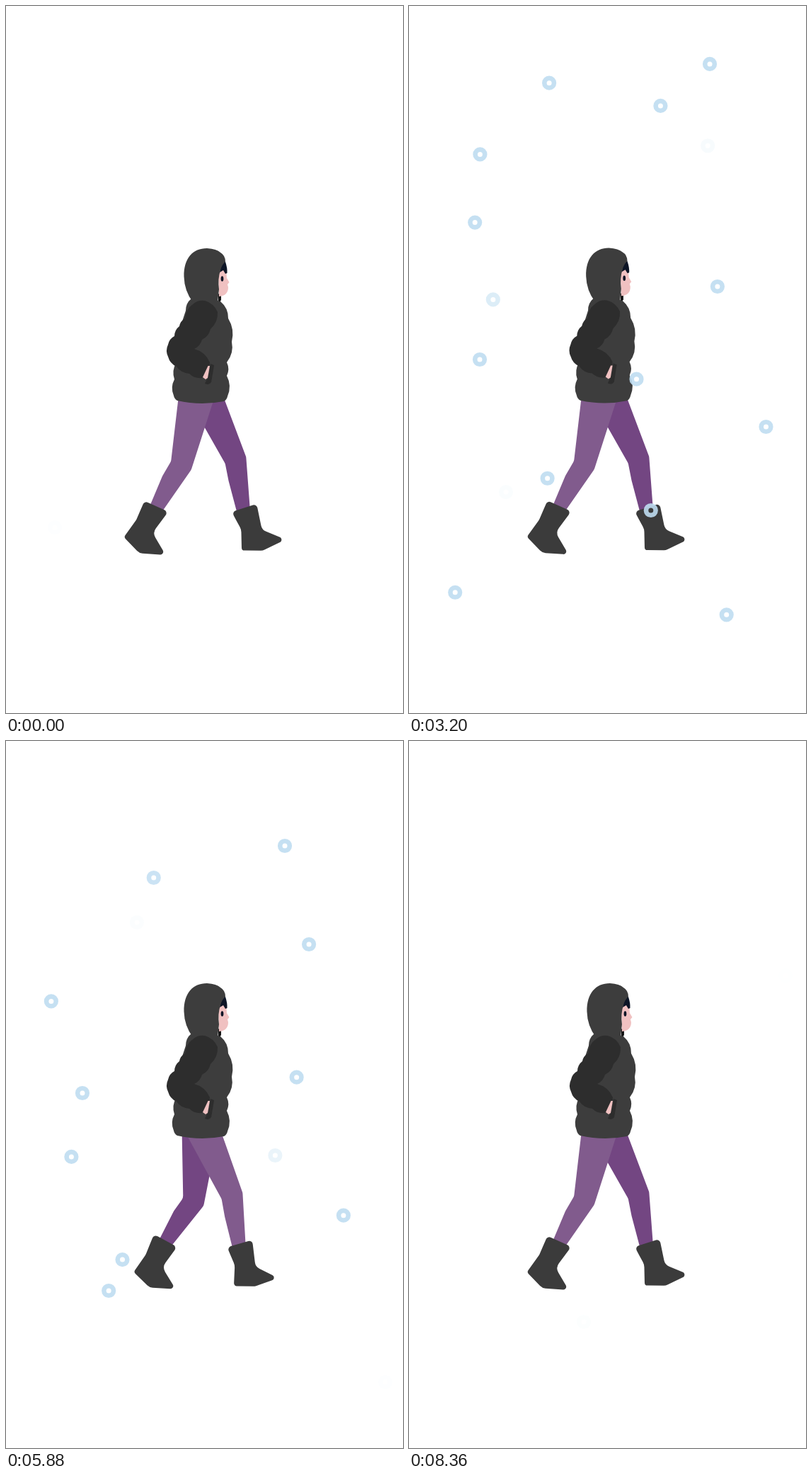
Recreate the animation shown at these times as an HTML page with a canvas. Size 561x998 px, loop 8.4 s.

```html
<!DOCTYPE html>
<html lang="en">
<head>
<meta charset="utf-8">
<title>Winter walk</title>
<style>
html, body { margin: 0; width: 100%; height: 100%; overflow: hidden; background: #fff; }
canvas { display: block; width: 561px; height: 998px; }
</style>
</head>
<body>
<canvas id="stage" width="561" height="998"></canvas>
<script>
const ctx = document.getElementById('stage').getContext('2d');
const LOOP = 8400, STEP = 40, WALK = 1680;
const THIGH = 99, SHIN = 68, FADE_IN = 0.5, FADE_OUT = 0.8, LIFE = 5.22;

const COLOR = {
  near: '#815b8d', far: '#734682', boot: '#3b3b3b', coat: '#3d3d3d',
  sleeve: '#2d2d2d', skin: '#f0c1c1', hair: '#0d1526', ring: '191,221,241'
};

// Where each flake appears: birth in seconds, x, y
const FLAKES = [
  [0, 69, 736], [0.45, 337, 622], [0.57, 342, 51], [0.68, 426, 771],
  [0.71, 75, 122], [0.95, 274, 451], [1.38, 122, 59], [1.6, 21, 454],
  [1.91, 364, 351], [1.98, 436, 549], [2.18, 369, 37], [2.2, 141, 622],
  [2.43, 56, 268], [2.92, 113, 407], [3.15, 422, 197], [3.18, 137, 686]
];

const rad = deg => deg * Math.PI / 180;
const clamp = v => Math.max(0, Math.min(1, v));
const ease = u => (1 - Math.cos(Math.PI * clamp(u))) / 2;
const mix = (a, b, u) => a + (b - a) * u;

// Padded outline: every edge swells outward a little
function puffy(points) {
  const path = new Path2D();
  path.moveTo(...points[0]);
  points.forEach(([x, y], i) => {
    const [nx, ny] = points[(i + 1) % points.length];
    const dx = nx - x, dy = ny - y, len = Math.hypot(dx, dy);
    const swell = Math.min(0.24, 7 / len);
    path.quadraticCurveTo((x + nx) / 2 + dy * swell, (y + ny) / 2 - dx * swell, nx, ny);
  });
  return path;
}

const coat = puffy([
  [262, 413], [303, 417], [314, 441], [319, 474], [312, 503], [312, 522],
  [313, 551], [308, 558], [242, 557], [237, 550], [238, 527], [241, 503], [254, 430]
]);
const sleeve = puffy([
  [281, 416], [299, 432], [289, 456], [277, 471], [266, 484], [288, 503], [277, 525],
  [259, 519], [241, 509], [229, 495], [229, 478], [238, 466], [245, 452], [253, 441], [264, 421]
]);
const hood = new Path2D('M264 418 Q252 402 251.5 382 C251 356 264 342 284 342 Q298 343 303 348 Q310 352 310 361 Q305 365 303 373 Q299 385 301 400 L299 418Z');
const face = new Path2D('M300 374 L311 370 L312 384 L315.5 390 L313 393 L314 397 Q314 409 301 410Z');
const hair = new Path2D('M304 361 L310 361 Q313 370 312.5 377 L310 378 L307 373 L302 376Z');
const strap = new Path2D('M300 406 L304 408 L304 415 L300 421Z');
const pocket = new Path2D('M289 505 L294 507 L290 531 Q287 536 281 533 L286 522Z');
const hand = new Path2D('M285.5 508 L288 508 L285 525 L282 527 L278 524Z');

function fill(path, color) {
  ctx.fillStyle = color;
  ctx.fill(path);
}

function roundPoly(points, color) {
  const path = new Path2D(), last = points[points.length - 1];
  path.moveTo((last[0] + points[0][0]) / 2, (last[1] + points[0][1]) / 2);
  points.forEach(([x, y, r], i) => {
    const next = points[(i + 1) % points.length];
    path.arcTo(x, y, next[0], next[1], r || 0);
  });
  path.closePath();
  fill(path, color);
}

// A point beside (x, y), measured along a direction
function beside(x, y, angle, dist, r) {
  return [x + dist * Math.cos(angle), y + dist * Math.sin(angle), r];
}

// First half of the gait swings the leg forward, second half carries it back.
// In the swing the knee leads and the ankle follows.
function gaitAt(gait) {
  const u = gait * 2 % 1;
  return gait < 0.5
    ? { knee: mix(-25, 49, ease(u ** 0.55)), ankle: mix(-61, 60, ease(u ** 0.75)), sole: mix(24, -13, ease(u)) }
    : { knee: mix(49, -25, ease(u)), ankle: mix(60, -61, ease(u)), sole: mix(-13, 24, u) };
}

function drawLeg(gait, center, hipY, color) {
  const { knee, ankle, sole } = gaitAt(gait);
  const hip = center + 0.13 * knee, kx = center + knee, ax = center + ankle;
  const ky = hipY + Math.sqrt(THIGH ** 2 - (kx - hip) ** 2);
  const ay = ky + Math.sqrt(SHIN ** 2 - (ax - kx) ** 2);
  const thigh = Math.atan2(ky - hipY, kx - hip) - Math.PI / 2;
  const shin = Math.atan2(ay - ky, ax - kx) - Math.PI / 2;
  const bend = (thigh + shin) / 2;
  roundPoly([
    [hip - 25.5, hipY], [hip + 25.5, hipY],
    beside(kx, ky, bend, 15.5, 10), beside(ax, ay + 4, shin, 9.5),
    beside(ax, ay + 4, shin, -9.5),
    beside(mix(kx, ax, 0.4), mix(ky, ay, 0.4), shin, -14.5, 25),
    beside(kx, ky, bend, -15.5, 10)
  ], color);

  const tilt = rad(sole), cos = Math.cos(tilt), sin = Math.sin(tilt);
  const turn = (x, y) => [x * cos - y * sin, x * sin + y * cos];
  const [hx, hy] = turn(-17.5 - 0.2 * sole, 58);
  const foot = (x, y, r) => {
    const [dx, dy] = turn(x, y);
    return [ax + hx + dx, ay + hy + dy, r];
  };
  const cuff = shin - rad(8);
  roundPoly([
    beside(ax + 1, ay, cuff, -18.5, 5), beside(ax + 1, ay, cuff, 18.5, 5),
    foot(33.5, -22, 12), foot(63, -1, 4),
    foot(28, 1 + 0.45 * Math.abs(sole), 12),
    foot(-1, 0, 4), foot(5, -29, 16)
  ], COLOR.boot);
}

function drawBody(lift, lean) {
  ctx.save();
  ctx.translate(275, 556 - lift);
  ctx.rotate(-lean);
  ctx.translate(-275, -556);
  fill(strap, '#161616');
  fill(face, COLOR.skin);
  fill(hair, COLOR.hair);
  ctx.beginPath();
  ctx.ellipse(305.5, 385, 1.9, 3.8, 0, 0, 7);
  ctx.fill();
  fill(coat, COLOR.coat);
  fill(hood, COLOR.coat);
  fill(sleeve, COLOR.sleeve);
  fill(pocket, COLOR.sleeve);
  fill(hand, COLOR.skin);
  ctx.restore();
}

// Three swings: each drops first, then glides sideways
function drift(age) {
  const third = Math.max(0, age - 3.02);
  return [
    79 * ease(age / 1.6) - 86 * ease((age - 1.65) / 1.45) + 117 * ease((third / 2.18) ** 0.9),
    45 * ease(age / 1.05) + 45 * ease((age - 1.6) / 1.05) + 44 * ease(third / 1.4)
  ];
}

function drawFlake([birth, x, y], sec) {
  const age = sec - birth;
  if (age < 0 || age > LIFE) return;
  const [dx, dy] = drift(age);
  const alpha = Math.min(1, (age + 0.02) / FADE_IN, (LIFE - age) / FADE_OUT);
  ctx.strokeStyle = `rgba(${COLOR.ring},${0.9 * alpha})`;
  ctx.lineWidth = 6.6;
  ctx.beginPath();
  ctx.arc(x + dx, y + dy, 6.8, 0, Math.PI * 2);
  ctx.stroke();
}

function draw(ms) {
  const phase = ms / WALK % 1;
  // The stride finishes early and rests until the next one
  const gait = Math.min(1, phase / 0.905);
  const swing = Math.sin(2 * Math.PI * phase) ** 2;
  const lift = 5 * swing * swing;
  ctx.fillStyle = '#fff';
  ctx.fillRect(0, 0, 561, 998);
  drawLeg((gait + 0.5) % 1, 275.5, 552 - lift, COLOR.far);
  drawLeg(gait % 1, 272.5, 552 - lift, COLOR.near);
  drawBody(lift, 0.0333 * swing ** 1.3);
  FLAKES.forEach(flake => drawFlake(flake, ms / 1000));
}

const start = performance.now();
function tick() {
  const t = (performance.now() - start) % LOOP;
  draw(Math.floor(t / STEP) * STEP);
  requestAnimationFrame(tick);
}
tick();
</script>
</body>
</html>
```
